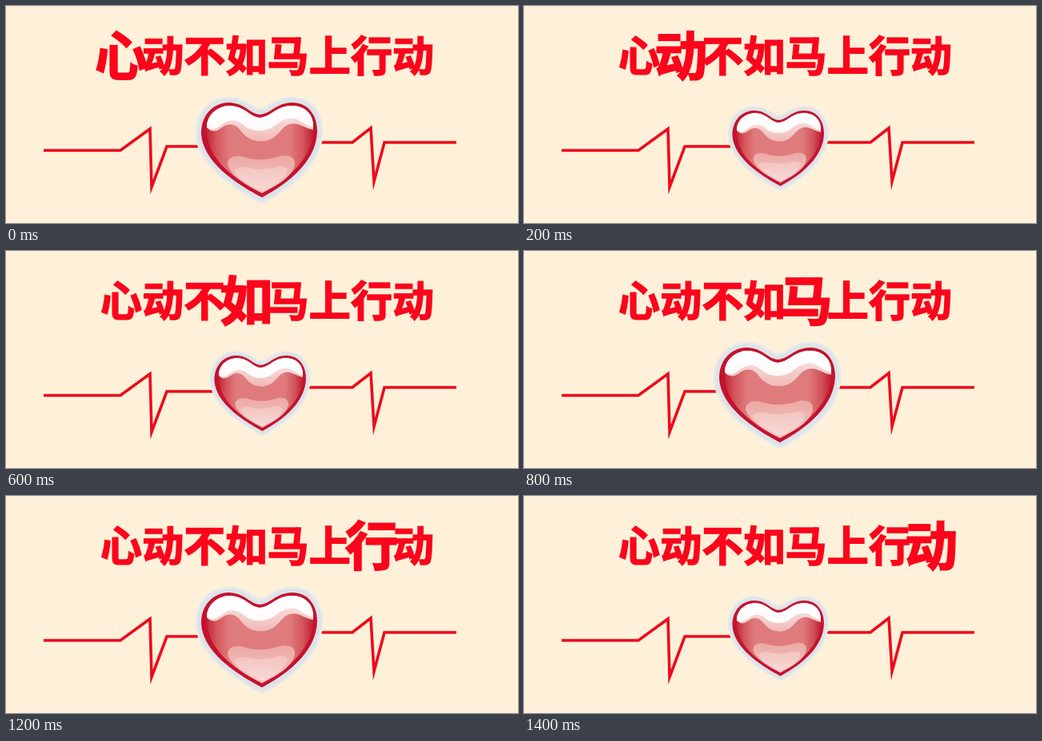
An HTML page with a canvas that plays this animation: 640 px wide and 272 px high, repeating every 1600 ms.

```html
<!DOCTYPE html>
<html lang="zh-CN">
<head>
<meta charset="utf-8">
<title>心动不如马上行动</title>
<style>
html, body { margin: 0; width: 100%; height: 100%; overflow: hidden; background: #fff1d9; }
canvas { display: block; }
</style>
</head>
<body>
<canvas id="stage" width="640" height="272" lang="zh-CN"></canvas>
<script>
const ctx = document.getElementById('stage').getContext('2d');
const STEP = 200;
const TEXT = [...'心动不如马上行动'];
const BG = '#fff1d9';
const RED = '#fb041c';

// Upper edges of the glossy area: left half from the notch, right half back to it.
const LEFT_TOP = 'M317 140C306 140 298 125 279 125C262 126 251 138 251 152';
const RIGHT_TOP = 'C385 137 375 125 357 125C338 125 330 140 317 140Z';

const heart = new Path2D('M317 136C306 136 298 121 278 121C257 122 244 138 244 160C246 195 286 222 320 240C355 221 388 194 389 157C389 135 376 121 358 121C338 121 330 136 317 136Z');
const body = new Path2D(LEFT_TOP + 'C249 192 287 218 320 235C353 217 384 190 385 154' + RIGHT_TOP);
const gloss = new Path2D(LEFT_TOP + 'C258 160 264 157 272 151C281 146 288 149 294 157C302 168 315 172 328 168C341 164 344 151 355 148C366 145 374 154 384 155' + RIGHT_TOP);
const shine = new Path2D(LEFT_TOP + 'C258 158 264 153 272 147C283 140 291 144 298 150C309 159 326 158 336 150C346 142 356 138 366 143C374 148 379 151 384 152' + RIGHT_TOP);
const glow = new Path2D('M277 197C279 187 290 187 300 190C314 194 327 193 340 189C352 185 362 189 361 198C359 213 340 225 320 234C301 225 279 212 277 197Z');
const glowCore = new Path2D('M286 207C290 200 300 202 309 204C321 206 331 203 341 201C351 200 354 205 349 212C342 221 332 227 320 232C307 226 289 217 286 207Z');

function gradient(x0, y0, x1, y1, stops) {
  const g = ctx.createLinearGradient(x0, y0, x1, y1);
  for (const [at, color] of stops) g.addColorStop(at, color);
  return g;
}

const down = (y0, y1, a, b) => gradient(0, y0, 0, y1, [[0, a], [1, b]]);

function fill(path, style) {
  ctx.fillStyle = style;
  ctx.fill(path);
}

function outline(path, color, width) {
  ctx.strokeStyle = color;
  ctx.lineWidth = width;
  ctx.stroke(path);
}

function polyline(...pts) {
  ctx.beginPath();
  for (let i = 0; i < pts.length; i += 2) ctx.lineTo(pts[i], pts[i + 1]);
  ctx.stroke();
}

function drawPulse() {
  ctx.strokeStyle = '#ee0a1c';
  ctx.lineWidth = 3.6;
  ctx.lineJoin = 'miter';
  ctx.miterLimit = 10;
  polyline(47, 181, 143, 181, 180, 154, 182, 227, 201, 176, 270, 176);
  polyline(370, 171, 433, 171, 456, 153, 460, 220, 473, 171, 563, 171);
}

function drawHeart(big) {
  ctx.save();
  if (!big) {
    ctx.translate(318.5, 178);
    ctx.scale(0.79, 0.795);
    ctx.translate(-317.5, -180);
  }
  ctx.lineJoin = 'round';
  outline(heart, '#e9eae8', 15);
  outline(heart, '#dde3e8', 10);
  fill(heart, '#c5122e');
  fill(body, gradient(249, 0, 385, 0, [
    [0, '#c2202f'], [0.1, '#d2545a'], [0.22, '#e07b7d'],
    [0.78, '#e07b7d'], [0.9, '#d2545a'], [1, '#c01a2e']
  ]));
  fill(gloss, down(124, 170, '#fbeeee', '#f0b9b5'));
  fill(shine, down(124, 158, '#ffffff', '#fefafa'));
  fill(glow, down(187, 234, '#eca8a4', '#f4c8c5'));
  fill(glowCore, down(200, 232, '#f3c3bf', '#f8d9d6'));
  ctx.restore();
}

function drawText(active) {
  ctx.fillStyle = ctx.strokeStyle = RED;
  ctx.textAlign = 'center';
  ctx.lineJoin = 'miter';
  ctx.miterLimit = 3;
  TEXT.forEach((ch, i) => {
    const size = i === active ? 66 : 52;
    const x = 144 + i * 52.15;
    const y = 62.2 + size * 0.38;
    ctx.font = `bold ${size}px "Noto Sans CJK SC", "Noto Sans CJK", sans-serif`;
    ctx.lineWidth = size * 0.03;
    ctx.fillText(ch, x, y);
    ctx.strokeText(ch, x, y);
  });
}

function frame(time) {
  const step = Math.floor(time / STEP) % TEXT.length;
  ctx.fillStyle = BG;
  ctx.fillRect(0, 0, 640, 272);
  drawPulse();
  drawHeart(step % 2 === 0);
  drawText(step);
}

let start;
function tick(now) {
  start ??= now;
  frame(now - start);
  requestAnimationFrame(tick);
}
frame(0);
requestAnimationFrame(tick);
</script>
</body>
</html>
```
